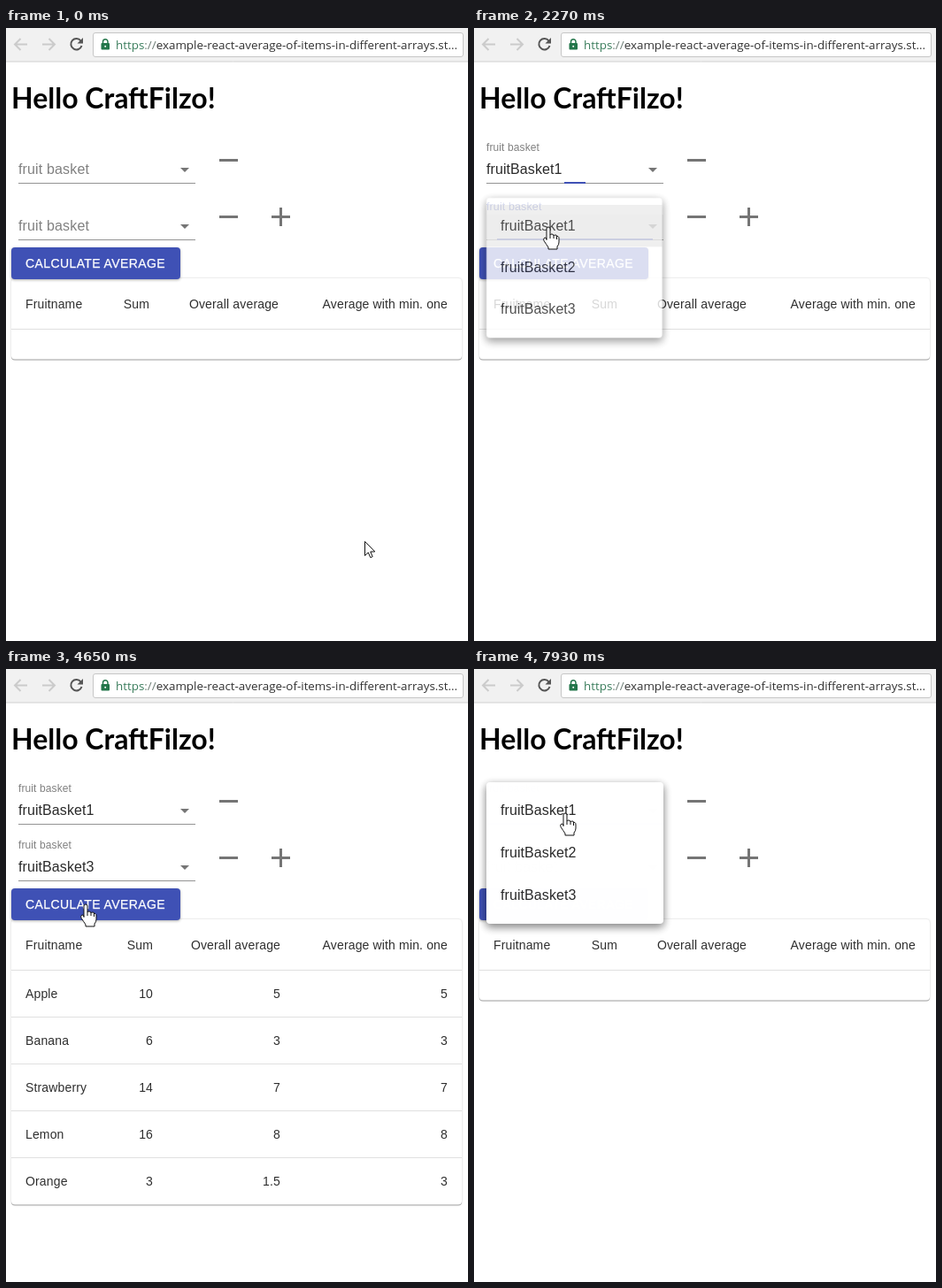
Write an HTML page that moves like this. It is 522x693 px and loops after 8 s.

```html
<!DOCTYPE html>
<html lang="en">
<head>
<meta charset="utf-8">
<title>Average of items</title>
<style>
  :root {
    --std: cubic-bezier(.4, 0, .2, 1);
    --out: cubic-bezier(0, 0, .2, 1);
    --blue: #3f51b5;
    --grey: #757575;
  }
  html, body { margin: 0; width: 100%; height: 100%; overflow: hidden; background: #fff; }
  svg.stage { display: block; width: 522px; height: 693px; }
  text { font-family: "Liberation Sans", Arial, sans-serif; white-space: pre; }
  .url { font: 13.4px "Open Sans", "Noto Sans", sans-serif; fill: #333; }
  .title { font: bold 32px Lato, sans-serif; }
  .input { font-size: 16px; letter-spacing: .005em; fill: rgba(0, 0, 0, .84); }
  .cell { font-size: 14px; letter-spacing: .01071em; fill: rgba(0, 0, 0, .82); }
  .end { text-anchor: end; }
  .caption { font-size: 14px; letter-spacing: .02857em; fill: #fff; stroke: #fff; stroke-width: .25; }
  .icon { fill: none; stroke: var(--grey); stroke-width: 3; }
  .rule { stroke: #e0e0e0; }
  .paper { fill: #fff; filter: drop-shadow(0 1px .4px rgba(0, 0, 0, .3)) drop-shadow(0 .5px 1px rgba(0, 0, 0, .2)); }
  .button { fill: var(--blue); filter: drop-shadow(0 1.5px 1.5px rgba(0, 0, 0, .32)); }
  .sheet { fill: #fff; filter: drop-shadow(0 4px 5px rgba(0, 0, 0, .32)) drop-shadow(0 2px 5px rgba(0, 0, 0, .24)); }
  .row { fill: rgba(0, 0, 0, .075); }
  .pointer { fill: #fff; stroke: #111; stroke-linejoin: round; }

  /* hard switches */
  .switch { animation: 8s step-end infinite; }
  .page { animation-name: page; }
  .empty { animation-name: empty; }
  .filled { animation-name: filled; }
  .value1 { animation-name: value1; }
  .value2 { animation-name: value2; }
  .focus1 { animation-name: focus1; }
  .focus2 { animation-name: focus2; }
  .hover1 { animation-name: hover1; }
  .hover2 { animation-name: hover2; }
  .hover3 { animation-name: hover3; }
  .hover4 { animation-name: hover4; }
  .tool { animation-name: tool; }
  .reload { animation-name: reload; }
  .stop { animation-name: stop; }
  .arrow { animation-name: arrow; }
  .hand { animation-name: hand; }
  @keyframes page { 0%, 89% { opacity: 1 } 80.5% { opacity: 0 } }
  @keyframes empty { 0%, 84% { opacity: 1 } 51.5% { opacity: 0 } }
  @keyframes filled { 0%, 84% { opacity: 0 } 51.5% { opacity: 1 } }
  @keyframes value1 { 0%, 84% { opacity: 0 } 20.5% { opacity: 1 } }
  @keyframes value2 { 0%, 84% { opacity: 0 } 39.05% { opacity: 1 } }
  @keyframes focus1 { 0%, 27% { opacity: 0 } 13.25%, 95.9% { opacity: 1 } }
  @keyframes focus2 { 0%, 50.5% { opacity: 0 } 27% { opacity: 1 } }
  @keyframes hover1 { 0%, 24% { opacity: 0 } 19% { opacity: 1 } }
  @keyframes hover2 { 0%, 34.3% { opacity: 0 } 26.6% { opacity: 1 } }
  @keyframes hover3 { 0%, 35.3% { opacity: 0 } 34.3% { opacity: 1 } }
  @keyframes hover4 { 0%, 43% { opacity: 0 } 35.3% { opacity: .4 } }
  @keyframes tool { 0%, 89.5% { opacity: 0 } 71.75% { opacity: 1 } }
  @keyframes reload { 0%, 89% { opacity: 1 } 77.75% { opacity: 0 } }
  @keyframes stop { 0%, 89% { opacity: 0 } 77.75% { opacity: 1 } }
  @keyframes arrow { 0%, 64.8% { opacity: 1 } 11.7%, 92.5% { opacity: 0 } }
  @keyframes hand { 0%, 64.8% { opacity: 0 } 11.7%, 92.5% { opacity: 1 } }

  /* floating labels and focus lines */
  .label { fill: var(--grey); letter-spacing: .00938em; }
  .label1 { animation: label1 8s var(--out) infinite, tint1 8s step-end infinite; }
  .label2 { animation: label2 8s var(--out) infinite, tint2 8s step-end infinite; }
  .line { fill: var(--blue); transform-origin: 114px 0; }
  .line1 { animation: line1 8s var(--out) infinite; }
  .line2 { animation: line2 8s var(--out) infinite; }
  @keyframes label1 {
    0%, 13.25%, 84.01%, 95.9% { transform: translate(14px, 165px) scale(1) }
    15.75%, 84%, 98.4%, 100% { transform: translate(14px, 138.5px) scale(.75) }
  }
  @keyframes label2 {
    0%, 27%, 84.01%, 100% { transform: translate(14px, 165px) scale(1) }
    29.5%, 84% { transform: translate(14px, 138.5px) scale(.75) }
  }
  @keyframes tint1 { 0%, 27% { fill: #808080 } 13.25%, 95.9% { fill: #3f51b5 } }
  @keyframes tint2 { 0%, 50.5% { fill: #808080 } 27% { fill: #3f51b5 } }
  @keyframes line1 {
    0%, 13.25%, 29.5%, 95.9% { transform: scaleX(0) }
    15.75%, 27%, 98.4%, 100% { transform: scaleX(1) }
  }
  @keyframes line2 {
    0%, 27%, 53%, 100% { transform: scaleX(0) }
    29.5%, 50.5% { transform: scaleX(1) }
  }

  /* menus: the scale runs faster than the fade */
  .menu1 { animation: fade1 8s var(--std) infinite, grow1 8s var(--std) infinite; }
  .menu2 { animation: fade2 8s var(--std) infinite, grow2 8s var(--std) infinite; }
  @keyframes fade1 {
    0%, 13.25%, 23.8%, 95.9% { opacity: 0 }
    16.6%, 20.5%, 99.2%, 100% { opacity: 1 }
  }
  @keyframes grow1 {
    0%, 13.25%, 23.8%, 95.9% { transform: scale(.75, .5625) }
    15.5%, 21.6%, 98.1%, 100% { transform: scale(1, 1) }
  }
  @keyframes fade2 {
    0%, 26.6%, 42.5%, 100% { opacity: 0 }
    29.95%, 39.15% { opacity: 1 }
  }
  @keyframes grow2 {
    0%, 26.6%, 42.5%, 100% { transform: scale(.75, .5625) }
    28.85%, 40.25% { transform: scale(1, 1) }
  }

  .ripple { opacity: 0; fill: rgba(0, 0, 0, .15); animation: ripple 8s var(--std) infinite; }
  .light { fill: rgba(255, 255, 255, .3); }
  @keyframes ripple {
    0% { transform: scale(.03) }
    6.9%, 100% { transform: scale(1) }
    0%, 3.6% { opacity: 1 }
    7.4%, 100% { opacity: 0 }
  }

  .cursor { animation: move 8s ease-in-out infinite; }
  @keyframes move {
    0%, .8% { transform: translate(405px, 580px); animation-timing-function: ease-in }
    10.75% { transform: translate(225px, 294px); animation-timing-function: ease-out }
    13%, 22% { transform: translate(86px, 160px) }
    26%, 33% { transform: translate(84px, 225px) }
    36.5%, 40% { transform: translate(91px, 319.5px) }
    43% { transform: translate(90px, 283px); animation-timing-function: ease-out }
    45.75%, 61.5% { transform: translate(90px, 266px) }
    67.9%, 88% { transform: translate(79px, 16px) }
    95%, 100% { transform: translate(103px, 163px) }
  }
</style>
</head>
<body>
<svg class="stage" viewBox="0 0 522 693">
  <defs>
    <g id="select">
      <path d="M14 175.5H214" stroke="#949494"/>
      <path d="M197 158H207L202 163Z" fill="#757575"/>
    </g>
    <path id="minus" class="icon" d="M241 149.5H262"/>
    <g id="items">
      <text class="input" x="16" y="37">fruitBasket1</text>
      <text class="input" x="16" y="85">fruitBasket2</text>
      <text class="input" x="16" y="133">fruitBasket3</text>
    </g>
    <rect id="sheet" class="sheet" width="200" height="160" rx="4"/>
  </defs>

  <g class="page switch">
    <text class="title" x="6" y="91">Hello CraftFilzo!</text>

    <g>
      <rect class="focus1 switch" x="14" y="147" width="200" height="28" fill="rgba(0,0,0,.05)"/>
      <use href="#select"/>
      <rect class="line line1" x="14" y="174" width="200" height="2"/>
      <text class="input label label1">fruit basket</text>
      <text class="input value1 switch" x="14" y="165">fruitBasket1</text>
      <use href="#minus"/>
    </g>
    <g transform="translate(0 64)">
      <rect class="focus2 switch" x="14" y="147" width="200" height="28" fill="rgba(0,0,0,.05)"/>
      <use href="#select"/>
      <rect class="line line2" x="14" y="174" width="200" height="2"/>
      <text class="input label label2">fruit basket</text>
      <text class="input value2 switch" x="14" y="165">fruitBasket3</text>
      <use href="#minus"/>
      <path class="icon" d="M300 149.5H321M310.5 139V160"/>
    </g>

    <g class="empty switch">
      <rect class="paper" x="6" y="283" width="509" height="91.5" rx="4"/>
      <text class="cell end" x="162" y="317">Sum</text>
      <text class="cell end" x="308" y="317">Overall average</text>
    </g>
    <g class="filled switch">
      <rect class="paper" x="6" y="283" width="509" height="322.5" rx="4"/>
      <path class="rule" d="M6 393.5H515M6 446.5H515M6 499.5H515M6 552.5H515"/>
      <text class="cell end" x="166" y="317">Sum</text>
      <text class="cell end" x="310" y="317">Overall average</text>
      <g id="rows"></g>
    </g>
    <text class="cell" x="22" y="317">Fruitname</text>
    <text class="cell end" x="499" y="317">Average with min. one</text>
    <path class="rule" d="M6 340.5H515"/>

    <rect class="button" x="6" y="248" width="191" height="36" rx="4"/>
    <text class="caption" x="22" y="271">CALCULATE AVERAGE</text>
    <svg x="6" y="248" width="191" height="36">
      <g transform="translate(84 19)"><circle class="ripple light" r="118" style="animation-delay:4.04s"/></g>
    </svg>

    <g transform="translate(14 128)">
      <g class="menu1">
        <use href="#sheet"/>
        <rect class="row hover1 switch" y="8" width="200" height="48"/>
        <svg y="8" width="200" height="48">
          <g transform="translate(72 25)"><circle class="ripple" r="118" style="animation-delay:1.54s"/></g>
        </svg>
        <use href="#items"/>
      </g>
    </g>
    <g transform="translate(14 192)">
      <g class="menu2">
        <use href="#sheet"/>
        <rect class="row hover2 switch" y="8" width="200" height="48"/>
        <rect class="row hover3 switch" y="56" width="200" height="48"/>
        <rect class="row hover4 switch" y="104" width="200" height="48"/>
        <svg y="104" width="200" height="48">
          <g transform="translate(76 25)"><circle class="ripple" r="118" style="animation-delay:2.99s"/></g>
        </svg>
        <use href="#items"/>
      </g>
    </g>
  </g>

  <g fill="none">
    <rect width="522" height="38" fill="#f1f1f1"/>
    <path d="M0 38H522" stroke="#d0d0d0"/>
    <rect class="tool switch" x="67" y="6" width="25" height="25" fill="#d9d9d9"/>
    <path d="M24 18.5H10M16.5 12L10 18.5L16.5 25M41 18.5H55M48.5 12L55 18.5L48.5 25" stroke="#cbcbcb" stroke-width="2"/>
    <g class="reload switch">
      <path d="M84.5 14.5A6.2 6.2 0 1 0 85.5 20" stroke="#555" stroke-width="2"/>
      <path d="M87 11V17.5H80.5Z" fill="#555"/>
    </g>
    <path class="stop switch" d="M74 13L85.5 24.5M85.5 13L74 24.5" stroke="#555" stroke-width="2"/>
    <rect x="98.5" y="5.5" width="418" height="27" rx="2.5" fill="#fff" stroke="#c6c6c6"/>
    <rect x="107.5" y="17" width="9.5" height="7.5" rx="1" fill="#23764a"/>
    <path d="M109.5 17V15.5A2.7 2.7 0 0 1 115 15.5V17" stroke="#23764a" stroke-width="1.5"/>
    <circle cx="112.2" cy="20.7" r="1" fill="#fff"/>
    <text class="url" x="124" y="24"><tspan fill="#3a7d5c">https</tspan><tspan fill="#6f7f77">://</tspan>example-react-average-of-items-in-different-arrays.st...</text>
  </g>

  <g class="cursor">
    <path class="pointer arrow switch" d="M.5 .5V16.5L4.3 13L6.8 18.7L9.2 17.6L6.8 12H11.8Z"/>
    <g class="pointer hand switch">
      <path d="M-2 2Q-2 0 0 0T2 2V9Q2 8 4 8T6 10Q6 9 8 9T9.5 11Q10 10 11 10.5T12 13V17Q12 20 10 22V25H0V23Q-2 20 -5 15.5Q-6 12.5 -4 12T-2 14.5Z"/>
      <path d="M2 9V13M6 10V13M9.5 11V14" fill="none"/>
    </g>
  </g>
</svg>
<script>
  const fruits = [
    ["Apple", 10, 5, 5],
    ["Banana", 6, 3, 3],
    ["Strawberry", 14, 7, 7],
    ["Lemon", 16, 8, 8],
    ["Orange", 3, 1.5, 3]
  ];
  const columns = [22, 166, 310, 499];
  document.getElementById("rows").innerHTML = fruits.map((fruit, row) =>
    fruit.map((value, col) =>
      `<text class="cell ${col ? "end" : ""}" x="${columns[col]}" y="${372 + 53 * row}">${value}</text>`
    ).join("")
  ).join("");
</script>
</body>
</html>
```
